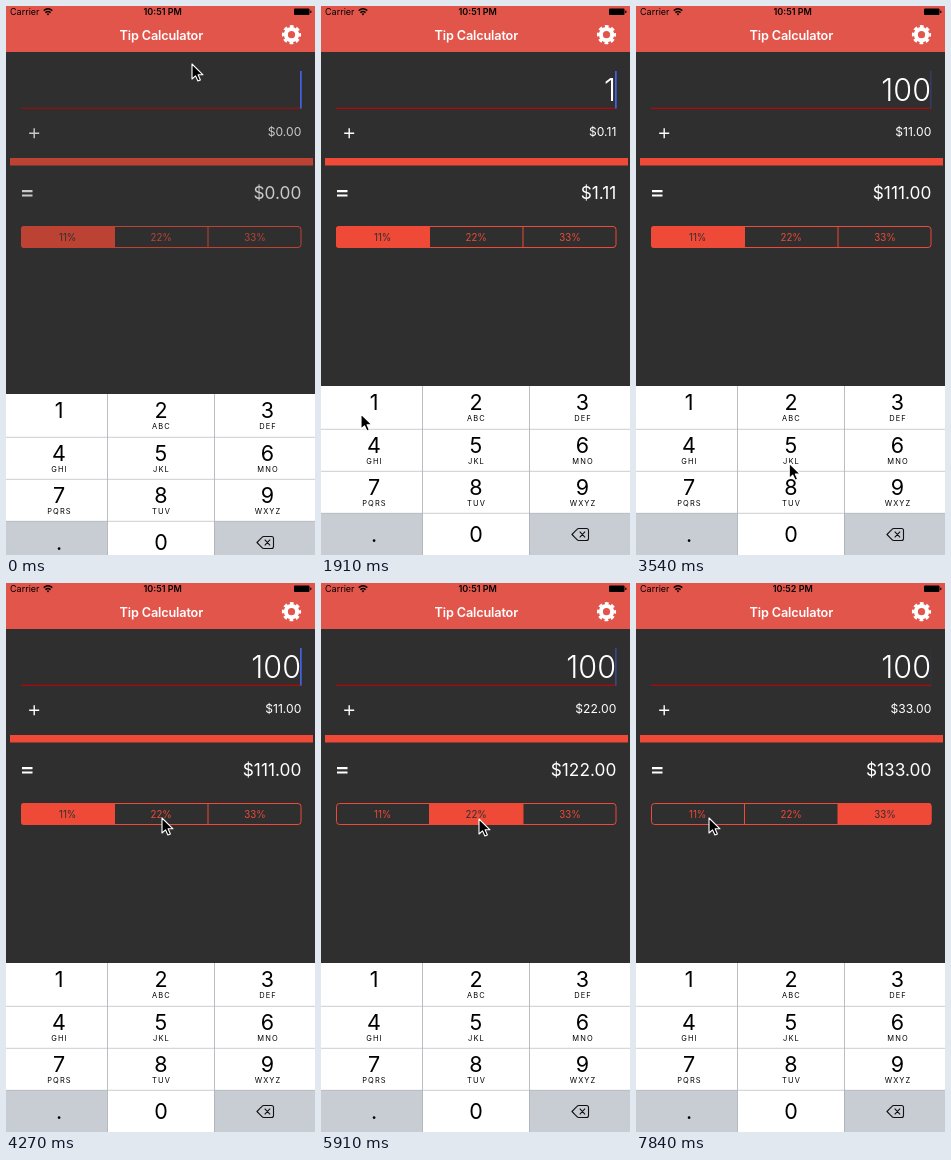
Animation, 309 px wide and 549 px high, one loop 7990 ms. Source, as an HTML page:

```html
<!DOCTYPE html>
<html lang="en">
<head>
<meta charset="utf-8">
<title>Tip Calculator</title>
<style>
  html, body { margin: 0; width: 100%; height: 100%; overflow: hidden; background: #2f2f2f; }
  svg { display: block; width: 309px; height: 549px; font-family: Inter, "Open Sans", sans-serif; }
  .mid { text-anchor: middle; }
  .end { text-anchor: end; }
  .digit { font-size: 21.5px; }
  .letters { font-size: 7.5px; letter-spacing: 1.1px; }
  .pct { font-size: 9.7px; }
</style>
</head>
<body>
<svg viewBox="0 0 309 549">
  <rect width="309" height="549" fill="#2f2f2f"/>

  <rect width="309" height="46" fill="#e2554a"/>
  <g font-size="9">
    <text x="4" y="9">Carrier</text>
    <text id="clock" class="mid" x="156.7" y="9" font-weight="600"></text>
  </g>
  <g fill="none" stroke="#000" stroke-width="1.4">
    <path d="M37.7 4.6Q42 .9 46.3 4.6M39.4 6.6Q42 4.4 44.6 6.6"/>
    <path d="M42 9.4l-1.4-1.6q1.4-1 2.8 0z" fill="#000" stroke="none"/>
  </g>
  <rect x="288" y="2.5" width="15.5" height="6.5" rx="1"/>
  <rect x="304.2" y="4.5" width="1.2" height="2.5" rx=".5"/>
  <text class="mid" x="155.3" y="34" font-size="12.7" font-weight="600" letter-spacing="-.15" fill="#fff">Tip Calculator</text>
  <g transform="translate(285.5 28.7)" fill="none" stroke="#fff">
    <circle r="5.6" stroke-width="4"/>
    <circle r="8.2" stroke-width="2.8" stroke-dasharray="3.7 2.74" stroke-dashoffset="1.85"/>
  </g>

  <text id="hint" class="end" x="295" y="94.5" font-size="30.5" font-weight="300" fill="#1d1d1d">$0</text>
  <g id="content" fill="#fff">
    <text id="bill" class="end" x="295" y="94.5" font-size="30.5" font-weight="300"></text>
    <rect x="15" y="101.7" width="280" height="1.2" fill="#b90606"/>
    <path d="M23.2 127.3h10M28.2 122.3v10" stroke="#fff" stroke-width="1.4"/>
    <text id="tip" class="end" x="295.3" y="130.4" font-size="12.1"></text>
    <rect x="4" y="152" width="303" height="7.5" fill="#ee4a37"/>
    <path d="M16 185.1h10.5M16 189.5h10.5" stroke="#fff" stroke-width="2.1"/>
    <text id="total" class="end" x="295.3" y="192.6" font-size="17.3"></text>
    <g id="segments">
      <rect x="15.5" y="220.5" width="279.5" height="21" rx="3" fill="none" stroke="#ee4a37"/>
      <path d="M108.5 221v20M202 221v20" stroke="#ee4a37"/>
    </g>
  </g>
  <rect id="caret" x="294" y="65" width="1.7" height="37.5" fill="#4262e0"/>

  <g id="pad"></g>

  <circle id="touch" r="10" fill="#fff" fill-opacity=".35" stroke="#222"/>
  <path id="pointer" d="M0 0V15l3.5-3.2 2.4 5.2 2.5-1.1-2.3-5.1H11Z" stroke="#fff" stroke-width="1.1" stroke-linejoin="round"/>
</svg>

<script>
const LOOP = 7990;
const $ = id => document.getElementById(id);

function add(parent, name, attrs, text = '') {
  const el = document.createElementNS('http://www.w3.org/2000/svg', name);
  for (const k in attrs) el.setAttribute(k, attrs[k]);
  el.textContent = text;
  parent.append(el);
  return el;
}

// Keypad
const cols = [[0, 101.5, 53], [101.5, 107, 155], [208.5, 100.5, 261.5]];
const rows = [380, 423, 465, 507];
const letters = ['', 'ABC', 'DEF', 'GHI', 'JKL', 'MNO', 'PQRS', 'TUV', 'WXYZ'];
const GREY = '#c8ccd3';
const pad = $('pad'), keys = {};
[...'123456789.0<'].forEach((label, i) => {
  const [x, w, cx] = cols[i % 3], row = i / 3 | 0, y = rows[row];
  const fill = label === '.' || label === '<' ? GREY : '#fff';
  keys[label] = add(pad, 'rect', { x, y, width: w, height: row % 3 ? 42 : 43, fill });
  if (label === '<') return;
  add(pad, 'text', { x: cx, y: y + (row === 3 ? 29 : 24), class: 'mid digit' }, label);
  if (letters[i]) add(pad, 'text', { x: cx + .5, y: y + 35.3, class: 'mid letters' }, letters[i]);
});
add(pad, 'path', {
  d: 'M0 423.3H309M0 465.3H309M0 507.3H309M101.5 380V549M208.5 380V549',
  stroke: '#b4b8be', 'stroke-width': .7
});
add(pad, 'path', {
  d: 'M251 528.5l5-5.2q.7-.8 1.8-.8h7.7q2 0 2 2v8q0 2-2 2h-7.7q-1.1 0-1.8-.8zM258.7 525.7l5.4 5.6m0-5.6l-5.4 5.6',
  fill: 'none', stroke: '#111', 'stroke-width': 1.1, 'stroke-linejoin': 'round'
});

// Tip choices
const segments = [
  ['M108.5 220H18q-3 0-3 3v16q0 3 3 3h90.5z', 61.7, '11%'],
  ['M108.5 220H202v22h-93.5z', 155.2, '22%'],
  ['M202 220h90.5q3 0 3 3v16q0 3-3 3H202z', 249, '33%']
].map(([d, x, label]) => ({
  back: add($('segments'), 'path', { d, fill: '#ee4a37' }),
  text: add($('segments'), 'text', { x, y: 234.6, class: 'mid pct' }, label)
}));

// Pointer stops: time, x, y
const path = [
  [0, 186, 58], [140, 186, 58], [440, 185, 64], [740, 185, 64], [880, 109, 221],
  [1030, 52, 350], [1180, 11, 444], [1320, 28, 420], [1470, 40, 408],
  [1960, 40, 408], [2350, 142, 516], [3250, 142, 516], [3390, 144, 507],
  [3700, 163, 405], [4000, 165, 295], [4270, 156, 235], [5400, 156, 235],
  [5560, 158, 236], [5960, 158, 236], [6360, 243, 235], [7260, 243, 235],
  [7840, 73, 235], [LOOP, 73, 235]
];

// Presses: start, end, key
const presses = [
  [1740, 1890, '1'], [2470, 2610, '0'], [2720, 2930, '0'],
  [5440, 5580], [6500, 6640]
];

const clamp = v => Math.max(0, Math.min(1, v));
const ramp = (t, a, b) => clamp((t - a) / (b - a));
const money = v => '$' + v.toFixed(2);

function pointerAt(t) {
  const i = path.findIndex(p => p[0] > t);
  const [t0, x0, y0] = path[i - 1], [t1, x1, y1] = path[i];
  const k = (t - t0) / (t1 - t0);
  return [x0 + (x1 - x0) * k, y0 + (y1 - y0) * k];
}

function caretAt(t) {
  if (t < 3400) return 1;
  const p = (t - 4830 + LOOP) % 1000 - LOOP % 1000;
  const phase = (p + 1000) % 1000;
  return ramp(phase, 0, 170) * (1 - ramp(phase, 620, 740));
}

function draw(t) {
  const intro = 1 - (1 - ramp(t, 90, 560)) ** 2;
  $('content').setAttribute('opacity', .74 + .26 * intro);
  pad.setAttribute('transform', `translate(0 ${8 * (1 - intro)})`);

  const bill = t < 1770 ? '' : t < 2490 ? '1' : t < 2740 ? '10' : '100';
  const choice = t < 5450 ? 0 : t < 6510 ? 1 : 2;
  const tip = bill * (choice + 1) * .11;
  $('bill').textContent = bill;
  $('hint').setAttribute('opacity', bill ? 0 : intro);
  $('tip').textContent = money(tip);
  $('total').textContent = money(+bill + tip);
  $('clock').textContent = t < 6200 ? '10:51 PM' : '10:52 PM';
  $('caret').setAttribute('opacity', caretAt(t));
  segments.forEach(({ back, text }, i) => {
    back.setAttribute('opacity', +(i === choice));
    text.setAttribute('fill', i === choice ? '#2f2f2f' : '#ee4a37');
  });

  const press = presses.find(([a, b]) => t >= a && t < b);
  for (const k of '10') keys[k].setAttribute('fill', press && press[2] === k ? GREY : '#fff');
  const [x, y] = pointerAt(t);
  $('pointer').setAttribute('transform', `translate(${x} ${y})`);
  $('touch').setAttribute('transform', `translate(${x + 2.5} ${y + 1.5})`);
  $('touch').setAttribute('opacity', press ? 1 : 0);
}

const start = performance.now();
function tick() {
  draw((performance.now() - start) % LOOP);
  requestAnimationFrame(tick);
}
tick();
</script>
</body>
</html>
```
